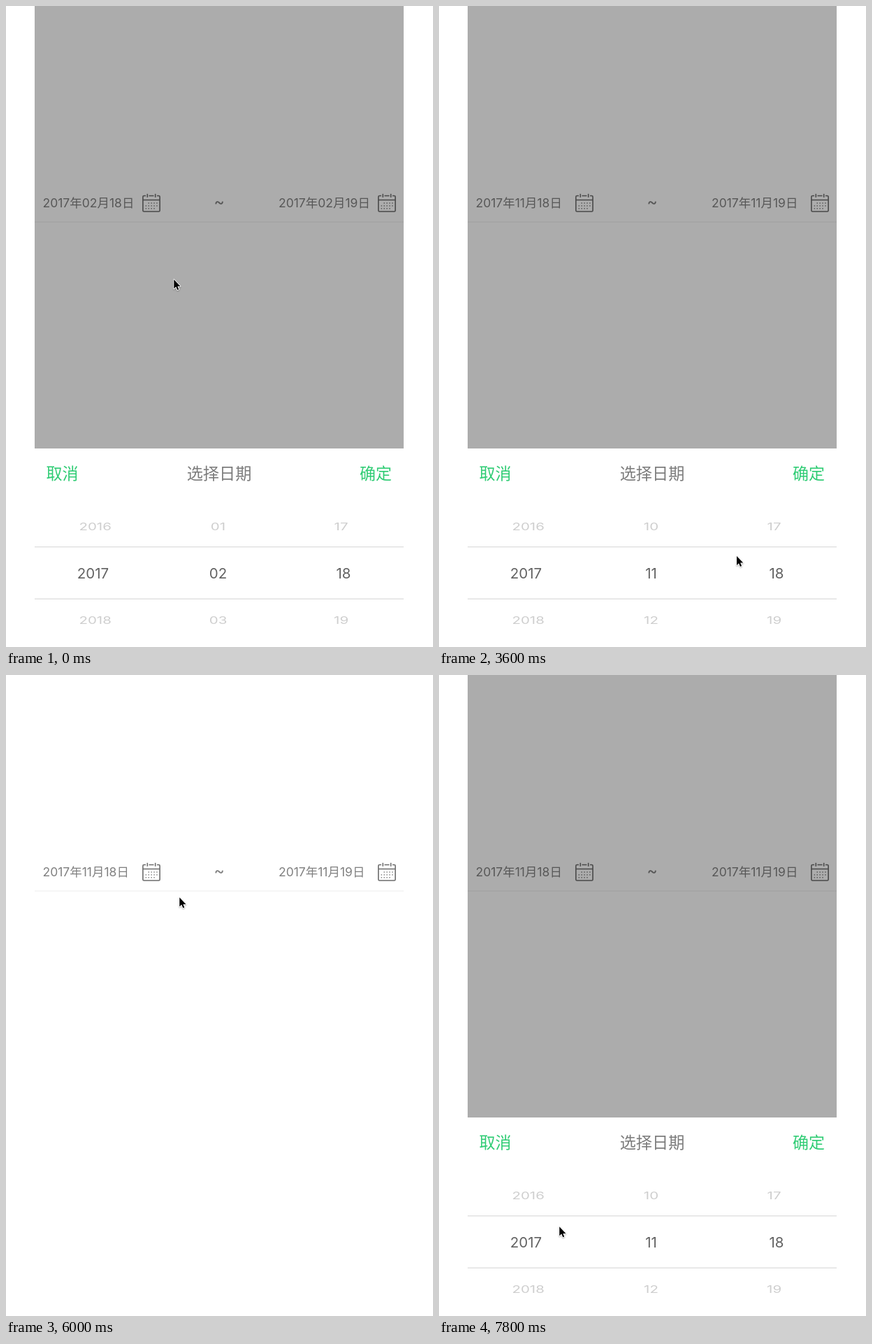
Write an HTML page with a canvas that moves like this. It is 611 by 917 pixels and loops after 8 s.

```html
<!DOCTYPE html>
<html lang="zh-CN">
<head>
<meta charset="utf-8">
<title>选择日期</title>
<style>
  html, body { margin: 0; width: 100%; height: 100%; overflow: hidden; background: #fff; }
  canvas { display: block; width: 611px; height: 917px; }
</style>
</head>
<body>
<canvas id="stage"></canvas>
<script>
const WIDTH = 611, HEIGHT = 917, LOOP = 8000, STEP = 200;
const LEFT = 41, SPAN = 528, MODAL_TOP = -32;
const CJK = '"Noto Sans CJK SC", "Noto Sans CJK JP", "Noto Sans CJK", sans-serif';
const FONT = 'Inter, ' + CJK;
const GREEN = '#2fcc74';

// The pointer rests between moves
const HOME = { x: 240, y: 391 };
const MOVES = [
  { start: 0, end: 1200, x: 318, y: 860 },
  { start: 1200, end: 1800, x: 338, y: 755 },
  { start: 1800, end: 2600, x: 391, y: 824 },
  { start: 3200, end: 4400, x: 525, y: 680 },
  { start: 4800, end: 5600, x: 345, y: 459 },
  { start: 5800, end: 6000, x: 248, y: 318 },
  { start: 6000, end: 6800, x: 205, y: 284 },
  { start: 7000, end: 7800, x: 172, y: 789 }
];
const SPIN = { start: 1200, end: 3200, from: 2, to: 11 };
const CONFIRM = 4600, DISMISS = 4662, PRESS = 6800, PRESENT = 6835;

const canvas = document.getElementById('stage');
const ctx = canvas.getContext('2d');
const ratio = window.devicePixelRatio || 1;
canvas.width = WIDTH * ratio;
canvas.height = HEIGHT * ratio;

const mix = (a, b, part) => a + (b - a) * part;
const progress = (time, { start, end }) =>
  Math.min(1, Math.max(0, (time - start) / (end - start)));
const smooth = part => part * part * (3 - 2 * part);

function pointerAt(time) {
  return MOVES.reduce((at, move) => {
    const part = smooth(progress(time, move));
    return { x: mix(at.x, move.x, part), y: mix(at.y, move.y, part) };
  }, HOME);
}

function monthAt(time) {
  const part = 1 - Math.pow(1 - progress(time, SPIN), 2.31);
  return mix(SPIN.from, SPIN.to, part);
}

// Share of the way left to go for a critically damped spring
function springLeft(time, start) {
  const x = Math.max(0, time - start) * 0.018;
  return (1 + x) * Math.exp(-x);
}

function sheetOffset(time) {
  const away = time < PRESENT ? 1 - springLeft(time, DISMISS) : springLeft(time, PRESENT);
  return away * (HEIGHT - MODAL_TOP);
}

function rect(x, y, w, h, color) {
  ctx.fillStyle = color;
  ctx.fillRect(x, y, w, h);
}

function text(string, x, y, size, color, align = 'left', family = FONT) {
  ctx.font = `${size}px ${family}`;
  ctx.textAlign = align;
  ctx.fillStyle = color;
  ctx.fillText(string, x, y);
}

function calendar(x, y, alpha) {
  const color = '#6c6c6c';
  ctx.save();
  ctx.translate(x, y);
  ctx.globalAlpha = alpha;
  ctx.strokeStyle = color;
  ctx.lineWidth = 1.6;
  ctx.stroke(new Path2D(
    'M5 3.5H2.4Q.9 3.5 .9 5V24.5Q.9 26 2.4 26H23.6Q25.1 26 25.1 24.5V5' +
    'Q25.1 3.5 23.6 3.5H21M9.5 3.5H16.5M1 9.5H25M7.3 .8V5.8M18.7 .8V5.8'
  ));
  // The month starts after the first cell and ends before the last
  for (let day = 1; day < 14; day++) {
    rect(4.6 + day % 5 * 3.9, 13.2 + Math.floor(day / 5) * 3.9, 1.5, 1.5, '#858585');
  }
  ctx.restore();
}

function page(month, iconAlpha) {
  text(`2017年${month}月18日`, 52.5, 288.2, 17.5, '#808080');
  text(`2017年${month}月19日`, 390, 288.2, 17.5, '#808080');
  text('~', 305, 288.4, 23, '#808080', 'center');
  calendar(195, 268, iconAlpha);
  calendar(532, 268, 1);
  rect(LEFT, 308.5, SPAN, 1, '#eeeeee');
}

// One column of a cylinder seen from the front
function wheel(x, position, label, lean, color) {
  const radius = 96, pitch = 0.773;
  const middle = Math.round(position);
  for (let item = middle - 2; item <= middle + 2; item++) {
    const angle = (item - position) * pitch;
    const squash = Math.cos(angle);
    if (squash < 0.15) continue;
    ctx.save();
    ctx.translate(x + lean * (1 - squash), 812 + radius * Math.sin(angle));
    ctx.scale(1, squash);
    ctx.globalAlpha = Math.min(1, squash / 0.7);
    text(label(item), 0, 7.4, 20.5, color, 'center');
    ctx.restore();
  }
}

function band(top, bottom, color, month) {
  const twoDigits = n => String((n + 11) % 12 + 1).padStart(2, '0');
  ctx.save();
  ctx.beginPath();
  ctx.rect(LEFT, top, SPAN, bottom - top);
  ctx.clip();
  wheel(124.5, 2017, String, 11, color);
  wheel(303.5, month, twoDigits, 0, color);
  wheel(483, 18, String, -12, color);
  ctx.restore();
}

function sheet(offset, month, confirmAlpha) {
  ctx.save();
  ctx.translate(0, offset);
  rect(LEFT, MODAL_TOP, SPAN, 665, 'rgba(0,0,0,.327)');
  rect(LEFT, 633, SPAN, 340, '#fff');
  text('取消', 57.5, 677.3, 23, GREEN, 'left', CJK);
  text('选择日期', 305, 677.3, 23.2, '#7c7c7c', 'center', CJK);
  ctx.globalAlpha = confirmAlpha;
  text('确定', 552, 677.3, 23, GREEN, 'right', CJK);
  ctx.globalAlpha = 1;
  band(715, 774, '#cecece', month);
  band(774, 848, '#626262', month);
  band(848, 910, '#cecece', month);
  rect(LEFT, 773, SPAN, 1.5, '#e2e2e2');
  rect(LEFT, 847.5, SPAN, 1.5, '#e2e2e2');
  ctx.restore();
}

function pointer({ x, y }) {
  const arrow = new Path2D('M0 0V13L3 10.3L5 15L7 14.1L5.1 9.6H9.2Z');
  ctx.save();
  ctx.translate(x + 0.3, y + 0.3);
  ctx.shadowColor = 'rgba(0,0,0,.3)';
  ctx.shadowBlur = 2 * ratio;
  ctx.shadowOffsetY = ratio;
  ctx.strokeStyle = '#fff';
  ctx.lineWidth = 1.8;
  ctx.lineJoin = 'round';
  ctx.stroke(arrow);
  ctx.shadowColor = 'transparent';
  ctx.fillStyle = '#000';
  ctx.fill(arrow);
  ctx.restore();
}

function draw(time) {
  const pressed = time >= PRESS && time < PRESS + 2 * STEP;
  ctx.setTransform(ratio, 0, 0, ratio, 0, 0);
  rect(0, 0, WIDTH, HEIGHT, '#fff');
  page(time < SPIN.end ? '02' : '11', pressed ? 0.55 : 1);
  sheet(sheetOffset(time), monthAt(time), time === CONFIRM ? 0.2 : 1);
  pointer(pointerAt(time));
}

const start = performance.now();
function tick() {
  const time = (performance.now() - start) % LOOP;
  draw(Math.floor(time / STEP) * STEP);
  requestAnimationFrame(tick);
}
tick();
</script>
</body>
</html>
```
